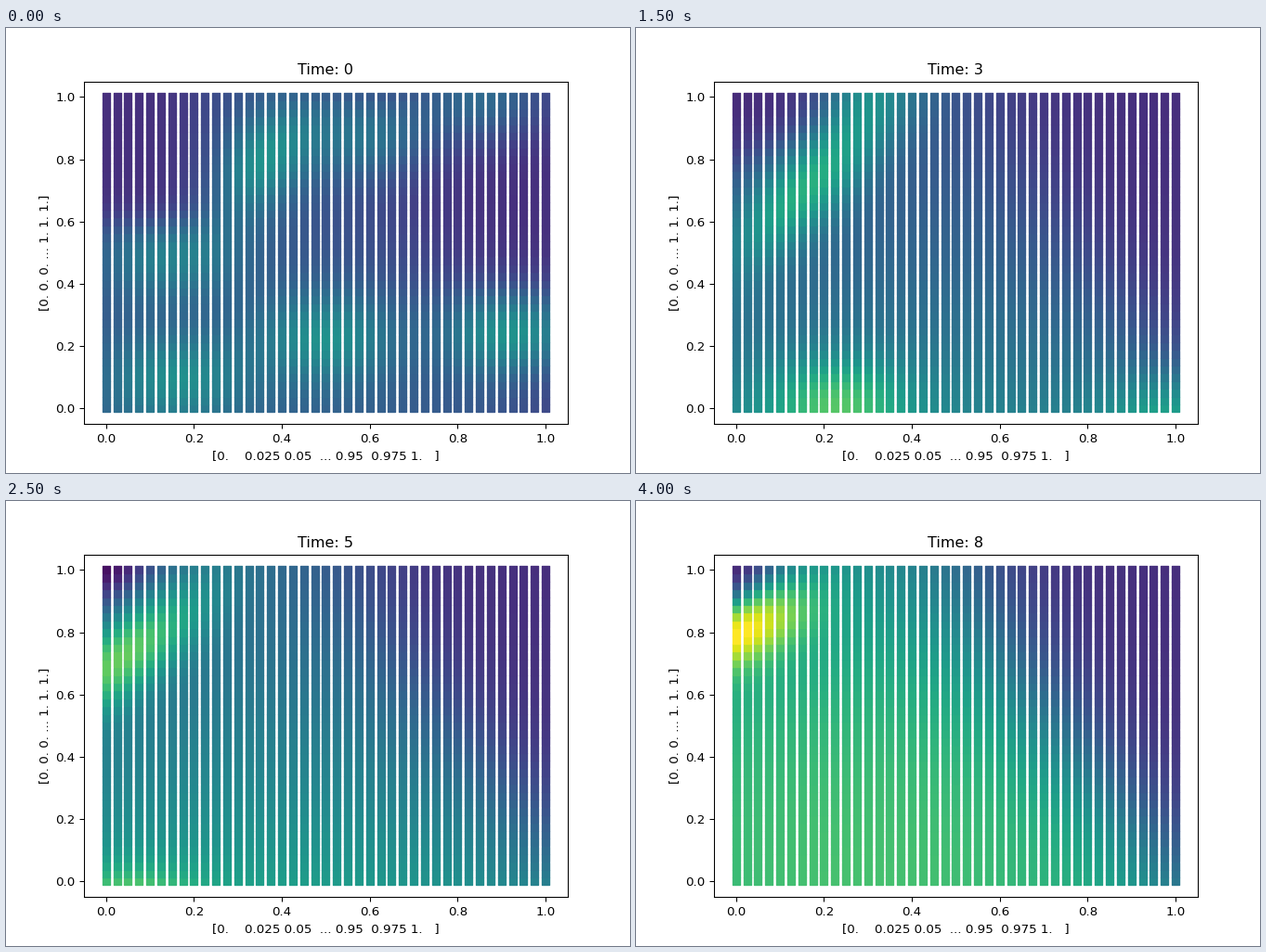
Animation of 672 by 480 pixels, one loop 4.5 s. Source, as a matplotlib script:

```python
import numpy as np
import matplotlib.pyplot as plt
from matplotlib.animation import FuncAnimation

STEPS = 9
INTERVAL = 500
FLOOR = .135

axis = np.linspace(0, 1, 41)
x, y = np.meshgrid(axis, axis)


def sigmoid(v):
    return 1 / (1 + np.exp(-v))


def bell(u, v):
    return np.exp(-u ** 2 - v ** 2)


def background(t, swell):
    """Level that rises with time and fades out behind a curved front."""
    low = .17 + .05 * t
    mid = .14 + .006 * t ** 2
    top = .12 + .004 * t ** 2
    level = (low * (1 - y) * (1 - 2 * y) + 4 * mid * y * (1 - y)
             + top * y * (2 * y - 1))
    arch = 1 - .5 * (x - .28) ** 2
    front = .54 + .05 * swell + (.5 + .08 * swell) * (1 - y) ** 1.3
    return level * arch * sigmoid((front - x) / .085)


def blob(t, start, speed, amp, growth):
    """Soft spot drifting at constant speed."""
    cx, cy = (s + v * t for s, v in zip(start, speed))
    return amp * np.exp(growth * t) * bell((x - cx) / .15, (y - cy) / .14)


def blobs(t):
    return (blob(t, (.15, .50), (-.10, -.05), .18, -.4)
            + blob(t, (.16, .10), (-.14, -.09), .20, 0)
            + blob(t, (.60, .88), (-.11, .05), .20, -.17)
            + blob(t, (.50, .23), (-.09, -.07), .22, .09)
            + blob(t, (.93, .25), (.02, -.09), .33, -.15)
            + blob(t, (.86, 1.0), (-.20, 0), .20, -.6))


def plume(t, swell):
    """Tilted streak that moves left and piles up against the wall."""
    angle = np.radians(70 - 4 * t)
    dx = x - .36 * max(0, 1 - t / 5.5)
    dy = y - .805 + .09 * swell
    along = np.cos(angle) * dx + np.sin(angle) * dy
    across = np.cos(angle) * dy - np.sin(angle) * dx
    return (.25 + .028 * t) * bell(along / (.18 + .1 * swell), across / .095)


def corner(t):
    """Dark upper left region, shrinking into a sloped wedge."""
    early = np.exp(-(t / 3) ** 2)
    edge = .925 - .32 * early + (1 - early) * x
    return sigmoid((y - edge) / .035) * sigmoid((.2 - x) / .035)


def pit(t):
    return .14 * np.exp(-((t - 6) / 2) ** 2) * bell(x / .08, (1 - y) / .06)


def field(t):
    swell = np.sin(np.pi * t / (STEPS - 1))
    total = background(t, swell) + plume(t, swell) + blobs(t)
    return np.clip(FLOOR - pit(t) + total * (1 - corner(t)), 0, 1)


fig, ax = plt.subplots(figsize=(7, 5), dpi=96)
dots = ax.scatter(x.ravel(), y.ravel(), c=field(0).ravel(), marker="s",
                  cmap="viridis", vmin=0, vmax=1)
ax.set_xlabel("[0.    0.025 0.05  ... 0.95  0.975 1.   ]")
ax.set_ylabel("[0. 0. 0. ... 1. 1. 1.]")
title = ax.set_title("Time: 0")


def draw(step):
    dots.set_array(field(step).ravel())
    title.set_text(f"Time: {step}")
    return dots, title


anim = FuncAnimation(fig, draw, frames=STEPS, interval=INTERVAL, repeat=True)
plt.show()
```
